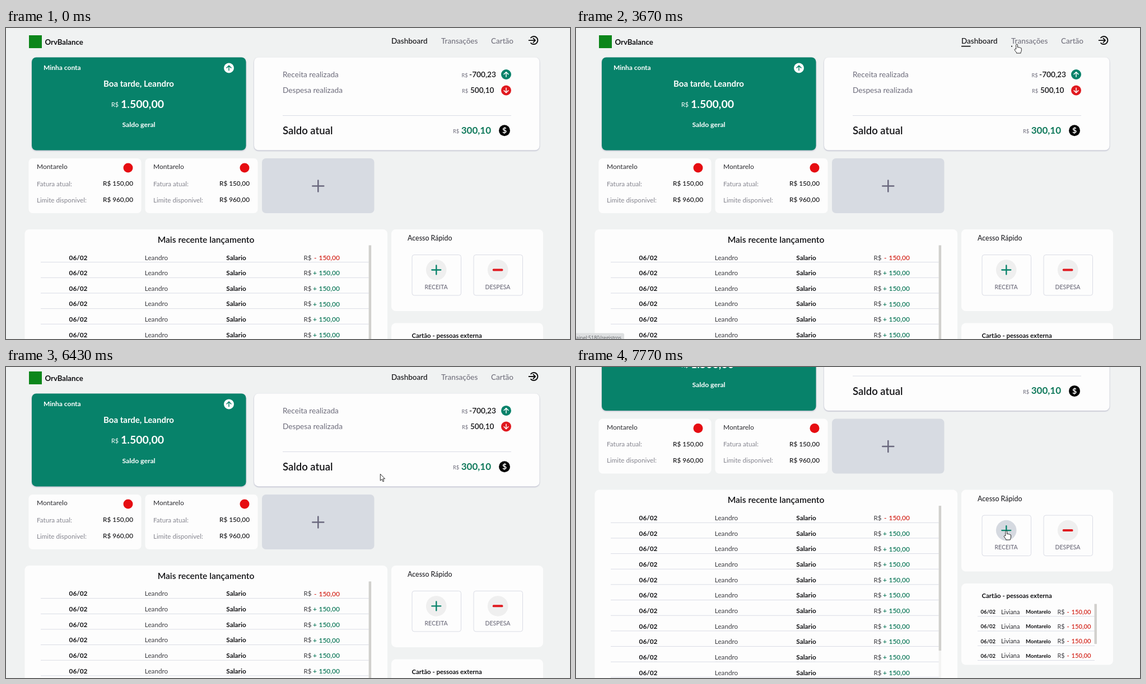
Recreate the animation shown at these times as an HTML page. Size 1007 px wide and 556 px high, loop 8000 ms.

```html
<!DOCTYPE html>
<html lang="pt-BR">
<head>
<meta charset="utf-8">
<title>Painel financeiro</title>
<style>
  html, body { margin: 0; width: 100%; height: 100%; overflow: hidden; background: #f0f2f2; }
  svg { display: block; width: 100vw; height: 100vh; font-family: Lato, "Open Sans", sans-serif; }
  .card { fill: #fdfdfd; }
  .lift { filter: drop-shadow(0 1px 1px rgba(70, 70, 120, .38)); }
</style>
</head>
<body>
<svg id="stage" viewBox="0 0 1007 556" preserveAspectRatio="none">
  <defs>
    <clipPath id="listClip"><rect x="33" y="385" width="648" height="312"/></clipPath>
    <clipPath id="extClip"><rect x="700" y="562" width="240" height="104"/></clipPath>
  </defs>
  <g id="page"></g>
  <g id="status">
    <path id="statusBox" fill="#dddfe0"/>
    <text id="statusText" x="0" y="557" font-family="Open Sans, sans-serif" font-size="8.8" fill="#5c5e62"></text>
  </g>
  <g id="cursor" stroke="#111" stroke-width=".9" stroke-linejoin="round" fill="#fff">
    <path id="arrow" d="M.3 .3V12.2L3 9.6L5 13.9L6.8 13.1L4.9 8.9H8.6Z"/>
    <path id="hand" d="M-1.4 8.8V1.4a1.4 1.4 0 0 1 2.8 0V5.6q1.5-.9 2.6 .4q1.5-.7 2.4 .6q1.8-.4 1.8 1.4V11q0 2-1.2 3.5V16H-.6V14.8Q-2.8 12.5-4.2 9.6Q-3.6 7.6-1.4 8.8Z"/>
  </g>
</svg>
<script>
const NS = 'http://www.w3.org/2000/svg';
const $ = id => document.getElementById(id);
const page = $('page');
const INK = '#121215', GREY = '#6d6c7b', SOFT = '#85858f', LINE = '#dadce5';
const GREEN = '#07826a', RED = '#e0191f', LOSS = '#d42a20', GAIN = '#117a5c';
const USER = 'Leandro', BANK = 'Montarelo', GUEST = 'Liviana';

function add(tag, attrs, parent = page) {
  const el = document.createElementNS(NS, tag);
  for (const k in attrs) el.setAttribute(k, attrs[k]);
  parent.appendChild(el);
  return el;
}

// y is the middle of the capitals
function text(x, y, size, str, fill = INK, weight = 400, anchor = 'start', parent = page) {
  add('text', { x, y: y + size * .36, 'font-size': size, fill, 'font-weight': weight,
    'text-anchor': anchor }, parent).textContent = str;
}
const mid = (x, y, size, str, fill, weight, parent) => text(x, y, size, str, fill, weight, 'middle', parent);
const end = (x, y, size, str, fill, weight, parent) => text(x, y, size, str, fill, weight, 'end', parent);
const rect = (x, y, width, height, rx, attrs, parent) => add('rect', { x, y, width, height, rx, ...attrs }, parent);
const disc = (cx, cy, r, fill) => add('circle', { cx, cy, r, fill });
const stroke = (d, color, width, parent) => add('path', { d, stroke: color, 'stroke-width': width,
  fill: 'none', 'stroke-linecap': 'round', 'stroke-linejoin': 'round' }, parent);
const hline = (x1, x2, y, parent) => rect(x1, y, x2 - x1, 1, 0, { fill: LINE }, parent);

function arrowBadge(x, y, back, front, dir) {
  disc(x, y, 9, back);
  stroke(`M${x} ${y - 4.3 * dir}V${y + 4.3 * dir}M${x - 3.9} ${y - .4 * dir}L${x} ${y - 4.3 * dir}L${x + 3.9} ${y - .4 * dir}`, front, 1.5);
}

// Header
rect(41, 13, 23, 23, 0, { fill: '#0d861b' });
text(69.5, 25.5, 13.2, 'OrvBalance', INK, 700);
const links = [
  { x: 688, w: 65, label: 'Dashboard', path: 'resumo', box: 76, on: 2900, off: 3470, fill: INK },
  { x: 777, w: 66, label: 'Transações', path: 'registros', box: 86, on: 3640, off: 4390, fill: '#74737f' },
  { x: 866, w: 40.5, label: 'Cartão', path: 'fatura', box: 73, on: 4510, off: 5800, fill: '#74737f' }
];
for (const l of links) {
  text(l.x, 23.2, 13.5, l.label, l.fill, 500);
  l.bar = rect(l.x, 31.8, 0, 1.7, 0, { fill: '#111' });
}
stroke('M937.2 17.4A7 7 0 1 1 937.2 26.8', '#111', 2);
stroke('M933.6 22.1H945M941.4 18.4L945.1 22.1L941.4 25.8', '#111', 1.9);

// Account
rect(46, 52.5, 382.5, 166, 8, { fill: GREEN, class: 'lift' });
text(67, 70.5, 12, 'Minha conta', '#fff', 700);
arrowBadge(398, 71.5, '#fff', GREEN, 1);
mid(237, 100, 15, 'Boa tarde, ' + USER, '#fff', 700);
text(188, 137.5, 10.8, 'R$', '#fff');
text(205, 135.5, 19.5, '1.500,00', '#fff', 700);
mid(237, 172.5, 12.2, 'Saldo geral', '#fff', 700);

// Balance
rect(443, 52.5, 509.5, 166, 8, { class: 'card lift' });
text(494, 83, 13.65, 'Receita realizada', GREY);
text(494, 111.5, 13.65, 'Despesa realizada', GREY);
text(813.5, 84.3, 9.2, 'R$', GREY);
end(875, 83, 13.7, '-700,23', INK, 600);
text(814, 112.5, 9.2, 'R$', GREY);
end(871.5, 111.5, 13.6, '500,10', INK, 600);
arrowBadge(893, 83, GREEN, '#fff', 1);
arrowBadge(893, 111.5, RED, '#fff', -1);
hline(494, 902, 156);
text(494, 183.5, 18.5, 'Saldo atual', INK, 600);
text(798, 184.7, 9.2, 'R$', GREY);
end(866, 182.5, 17, '300,10', GAIN, 700);
disc(890, 183.3, 10, '#050505');
mid(890, 183.3, 14, '$', '#fff', 700);

// Bank cards
for (const x of [40.5, 248.5]) {
  rect(x, 233, 201, 98, 7, { class: 'card' });
  text(x + 14.5, 248, 12, BANK, '#2b2b30');
  disc(x + 177.5, 250, 8.5, '#e60d12');
  text(x + 14.5, 278.5, 11.65, 'Fatura atual:', SOFT);
  text(x + 14.5, 307.5, 11.65, 'Limite disponivel:', SOFT);
  end(x + 186.5, 278, 11.75, 'R$ 150,00', INK, 500);
  end(x + 186.5, 307, 11.75, 'R$ 960,00', INK, 500);
}
rect(457, 233, 200.5, 98, 7, { fill: '#d7dbe2' });
stroke('M547.3 282.5H567.3M557.3 272.5V292.5', '#6a687e', 2.5);

// Latest entries
rect(33.5, 360, 647.5, 345, 8, { class: 'card' });
mid(357, 378, 15.6, 'Mais recente lançamento', INK, 600);
const list = add('g', { 'clip-path': 'url(#listClip)' });
for (let i = 0; i < 11; i++) {
  const y = 410.3 + i * 27.65, color = i ? GAIN : LOSS;
  mid(129, y, 11.8, '06/02', INK, 700, list);
  mid(268.5, y, 11.7, USER, '#3b3b40', 400, list);
  mid(411, y, 11.8, 'Salario', INK, 700, list);
  text(531.5, y, 11.7, 'R$', '#3b3b40', 400, 'start', list);
  text(i ? 548 : 550, y, 12, i ? '+' : '-', color, 600, 'start', list);
  end(596, y, 12, '150,00', color, 600, list);
  hline(62, 648, y + 7.9, list);
}
rect(647.7, 388.5, 4.4, 308, 0, { fill: '#f3f3f2' });
rect(647.7, 388.5, 4.4, 259, 0, { fill: '#d1d0cd' });

// Quick access
rect(688, 360, 271, 146, 8, { class: 'card' });
text(717, 375.5, 12.4, 'Acesso Rápido', '#222227', 500);
function button(x, label) {
  rect(x + .5, 405.5, 87.5, 72.5, 4, { fill: 'none', stroke: LINE });
  const c = disc(x + 43.7, 432.5, 18.3, '#efefef');
  mid(x + 43.5, 463, 10.5, label, GREY, 500);
  return c;
}
const addDisc = button(724.5, 'RECEITA');
button(834.5, 'DESPESA');
stroke('M760.3 432.5H776.3M768.3 424.5V440.5', GREEN, 2.3);
rect(868.8, 430.4, 18.6, 4, 1.6, { fill: RED });

// Guests on the card
rect(688, 527.5, 271, 145.5, 8, { class: 'card' });
text(724.5, 549.6, 11.4, 'Cartão - pessoas externa', INK, 700);
const ext = add('g', { 'clip-path': 'url(#extClip)' });
for (let i = 0; i < 4; i++) {
  const y = 578 + i * 26.25;
  text(722.5, y, 9.5, '06/02', INK, 700, 'start', ext);
  text(759, y, 10.9, GUEST, '#2b2b30', 400, 'start', ext);
  text(803, y, 9.6, BANK, INK, 700, 'start', ext);
  text(859.5, y, 10.9, 'R$', '#3b3b40', 400, 'start', ext);
  text(876.5, y, 11.2, '-', LOSS, 600, 'start', ext);
  end(919.5, y, 11.2, '150,00', LOSS, 600, ext);
  hline(717, 926, y + 7.7, ext);
}
rect(925.5, 564, 4.4, 71.5, 0, { fill: '#d1d0cd' });

// Motion tables: [ms, values...]
const LOOP = 8000;
const scrollKeys = [[6395, 0], [6430, 4.5], [6465, 24], [6500, 57], [6530, 84], [6565, 107],
  [6600, 124.4], [6665, 132.5], [6735, 137.2], [6805, 139.6], [6870, 140.4]];
const cursorKeys = [[1660, 566, -16], [1900, 584, 22], [2180, 604, 50], [2430, 615, 63], [2500, 615, 63],
  [2680, 650, 50], [2900, 694, 31], [3180, 722, 26], [3400, 736, 26], [3520, 756, 28],
  [3670, 787, 29], [3850, 806, 27], [4080, 815, 26], [4250, 822, 25], [4510, 866, 23],
  [4760, 886, 22], [5700, 886, 22], [5820, 866, 40], [6000, 770, 112], [6200, 692, 176],
  [6360, 668, 191], [6500, 668, 191], [6600, 667.5, 193], [7100, 667.5, 193],
  [7280, 694, 214], [7460, 732, 254], [7600, 758, 282], [7750, 768.3, 293]];

const clamp = v => Math.max(0, Math.min(1, v));
const ease = v => v * v * (3 - 2 * v);

function sample(keys, t) {
  if (t <= keys[0][0]) return keys[0].slice(1);
  for (let i = 1; i < keys.length; i++) {
    const a = keys[i - 1], b = keys[i];
    if (t < b[0]) {
      const p = (t - a[0]) / (b[0] - a[0]);
      return a.slice(1).map((v, k) => v + (b[k + 1] - v) * p);
    }
  }
  return keys[keys.length - 1].slice(1);
}

function draw(t) {
  const [top] = sample(scrollKeys, t);
  page.setAttribute('transform', `translate(0 ${-top})`);

  let shown = null, hovering = t >= 7580;
  for (const l of links) {
    const p = ease(clamp((t - l.on) / 300)) - ease(clamp((t - l.off) / 300));
    l.bar.setAttribute('width', Math.max(0, l.w * p));
    if (t >= l.on && t < l.off) hovering = true;
    if (t >= l.on + 20 && t < l.off + 200) shown = l;
  }

  $('status').style.display = shown ? '' : 'none';
  if (shown) {
    $('statusBox').setAttribute('d', `M0 545.5H${shown.box - 3}q3 0 3 3V556H0Z`);
    $('statusText').textContent = 'ainel:5180/' + shown.path;
  }

  const [x, y] = sample(cursorKeys, t);
  $('cursor').style.display = t < 1660 ? 'none' : '';
  $('cursor').setAttribute('transform', `translate(${x} ${y})`);
  $('hand').style.display = hovering ? '' : 'none';
  $('arrow').style.display = hovering ? 'none' : '';
  addDisc.setAttribute('fill', t >= 7580 ? '#d5d9e0' : '#efefef');
}

const start = performance.now();
function tick() {
  draw((performance.now() - start) % LOOP);
  requestAnimationFrame(tick);
}
tick();
</script>
</body>
</html>
```
